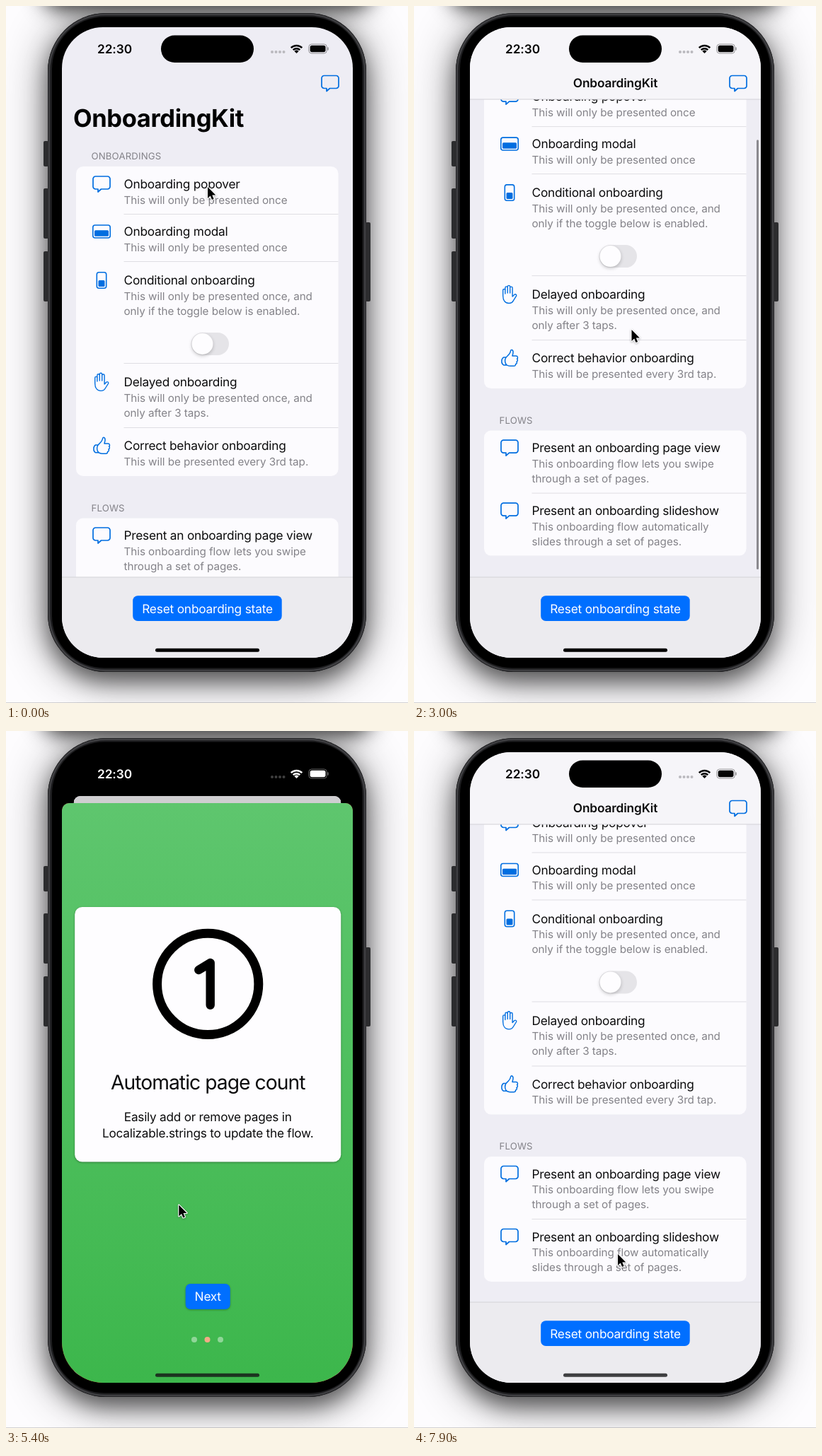
These frames come from a looping animation (568 px wide and 986 px high, 8000 ms). An HTML page with a canvas:

```html
<!DOCTYPE html>
<html lang="en">
<head>
<meta charset="utf-8">
<title>OnboardingKit</title>
<style>
  html, body { margin: 0; width: 100%; height: 100%; overflow: hidden; background: #fdfcfe; }
  canvas { display: block; width: 568px; height: 986px; }
</style>
</head>
<body>
<canvas id="stage"></canvas>
<script>
const W = 568, H = 986, LOOP = 8000, STEP = 100;
const BLUE = '#006ee0', TINT = '#006fff', GREY = '#838288', INK = '#0c0c0d';
const MAX_SCROLL = 122.5, PAGE_W = 411, MID = 284.5;
const canvas = document.getElementById('stage');
const ctx = canvas.getContext('2d');
const dpr = window.devicePixelRatio || 1;
canvas.width = W * dpr;
canvas.height = H * dpr;

const clamp = v => Math.max(0, Math.min(1, v));
const smooth = u => u * u * (3 - 2 * u);
const easeOut = u => 1 - (1 - u) ** 3;
const ramp = (t, a, b) => clamp((t - a) / (b - a));
const mix = (a, b, u) => a + (b - a) * u;
const mixRgb = (a, b, u) => `rgb(${a.map((v, i) => Math.round(mix(v, b[i], u)))})`;
const spring = ms => ms <= 0 ? 0 : 1 - Math.exp(-ms * .015) * (1 + ms * .015);

// ---------- timing ----------
const DRAG_LIST = 1800, DROP_LIST = 2700, OPEN = 3608, CLOSE = 6900;
const SWIPES = [
  { from: 4900, to: 5100, flip: 5118, x: 365 },
  { from: 5780, to: 6050, flip: 6054, x: 417.5 }
];
const POINTER = [
  [0, 286, 257], [900, 286, 257], [1500, 318, 455], [1800, 318, 455],
  [2400, 313, 288], [2700, 313, 288], [3300, 304, 630], [3900, 304, 630],
  [4700, 359, 651], [4800, 359, 651], [4900, 365, 655], [5100, 195, 665],
  [5250, 185, 665], [5700, 417.5, 690], [5780, 417.5, 690], [6000, 218, 696],
  [6050, 218, 696], [6600, 281, 803], [6950, 281, 803], [7500, 289, 741], [8000, 289, 741]
];

function pointerAt(t) {
  let i = 1;
  while (i < POINTER.length - 1 && POINTER[i][0] < t) i++;
  const [a, b] = [POINTER[i - 1], POINTER[i]];
  const u = smooth(ramp(t, a[0], b[0]));
  return { x: mix(a[1], b[1], u), y: mix(a[2], b[2], u) };
}

// Finger distance turned into scroll, with rubber band past the end.
function scrollAt(t) {
  const pulled = 455 - pointerAt(Math.max(DRAG_LIST, Math.min(t, DROP_LIST))).y;
  const s = Math.min(pulled, MAX_SCROLL) + Math.max(0, pulled - MAX_SCROLL) * .483;
  return t < DROP_LIST ? s : mix(s, MAX_SCROLL, easeOut(ramp(t, DROP_LIST, 3200)));
}

function pageOffsetAt(t) {
  let off = 0;
  for (const s of SWIPES) {
    if (t < s.from) break;
    const drag = s.x - pointerAt(Math.min(t, s.to)).x;
    off += mix(drag, PAGE_W, easeOut(ramp(t, s.to, s.to + 350)));
  }
  return off;
}

// ---------- drawing helpers ----------
function box(x, y, w, h, r, fill) {
  ctx.beginPath();
  ctx.roundRect(x, y, w, h, r);
  if (fill) { ctx.fillStyle = fill; ctx.fill(); }
}

function disc(x, y, r, fill) {
  ctx.beginPath();
  ctx.arc(x, y, r, 0, 7);
  ctx.fillStyle = fill;
  ctx.fill();
}

function withShadow(color, blur, dy, draw) {
  ctx.save();
  ctx.shadowColor = color;
  ctx.shadowBlur = blur * dpr;
  ctx.shadowOffsetY = dy * dpr;
  draw();
  ctx.restore();
}

// y is the middle of the capitals; track is in em.
function text(str, x, y, size, color = INK, { weight = 400, align = 'left', track = -.013 } = {}) {
  const base = 14;
  ctx.save();
  ctx.translate(x, y + size * .3635);
  ctx.scale(size / base, size / base);
  ctx.font = `${weight} ${base}px Inter, "Open Sans", sans-serif`;
  ctx.textRendering = 'geometricPrecision';
  ctx.letterSpacing = track * base + 'px';
  ctx.textAlign = align;
  ctx.fillStyle = color;
  ctx.fillText(str, 0, 0);
  ctx.restore();
}

const centred = (str, x, y, size, color, more) => text(str, x, y, size, color, { align: 'center', ...more });

function outline(path, x, y, color, width) {
  ctx.save();
  ctx.translate(x, y);
  ctx.strokeStyle = color;
  ctx.lineWidth = width;
  ctx.lineCap = ctx.lineJoin = 'round';
  ctx.stroke(path);
  ctx.restore();
}

// ---------- icons ----------
const BUBBLE = new Path2D('M-8.5-11H8.5a3.5 3.5 0 0 1 3.5 3.5V3.5A3.5 3.5 0 0 1 8.5 7H-.5L-5 11V7H-8.5A3.5 3.5 0 0 1-12 3.5V-7.5A3.5 3.5 0 0 1-8.5-11Z');
const HAND = new Path2D('M-9.3 2V-6a1.6 1.6 0 0 1 3.2 0V-1M-6.1-2V-9.5a1.7 1.7 0 0 1 3.4 0V-2M-2.7-3V-11a1.7 1.7 0 0 1 3.4 0V-2M.7-3V-9.3a1.7 1.7 0 0 1 3.4 0V3L7 0a1.7 1.7 0 0 1 2.6 2L5.5 8.5C4 11.5 1.5 12.4-1 12.4-6 12.4-9.3 8.5-9.3 2');
const THUMB = new Path2D('M-5-1C-3-3 1-6 1.5-10 1.8-12.8 5.5-12.2 5-7.5 4.8-5.5 4-4 4-3H9C12-3 12 .5 10.5 1 12 2 11.5 4.5 10 5 11 6.5 10 8.5 8.5 8.5 8.8 10.5 7.5 11.2 6 11.2H1C-2 11.2-3 10-5.5 9.5M-5-1H-8.5C-12 1-12 8-8.5 9.8H-4C-7 7-7 2-5-1');

const ICONS = {
  bubble: (x, y, c) => outline(BUBBLE, x, y, c, 1.7),
  hand: (x, y, c) => outline(HAND, x, y, c, 1.4),
  thumb: (x, y, c) => outline(THUMB, x, y, c, 1.5),
  modal: (x, y, c) => panel(x, y, 26, 19.5, 8.5, c),
  sheet: (x, y, c) => panel(x, y, 15, 24, 9, c)
};

function panel(x, y, w, h, fillH, color) {
  box(x - w / 2 + .8, y - h / 2 + .8, w - 1.6, h - 1.6, 3);
  ctx.strokeStyle = color;
  ctx.lineWidth = 1.6;
  ctx.stroke();
  box(x - w / 2 + 3, y + h / 2 - 3 - fillH, w - 6, fillH, 1.5, color);
}

// ---------- list screen ----------
const ONCE = 'This will only be presented once';
const ROWS = [
  { y: 252, icon: 'bubble', title: 'Onboarding popover', lines: [ONCE] },
  { y: 319, icon: 'modal', title: 'Onboarding modal', lines: [ONCE], rule: 294.5 },
  { y: 388, icon: 'sheet', title: 'Conditional onboarding', lines: [ONCE + ', and', 'only if the toggle below is enabled.'], rule: 361.5 },
  { y: 532, icon: 'hand', title: 'Delayed onboarding', lines: [ONCE + ', and', 'only after 3 taps.'], rule: 505.5 },
  { y: 622, icon: 'thumb', title: 'Correct behavior onboarding', lines: ['This will be presented every 3rd tap.'], rule: 596.5 },
  { y: 749, icon: 'bubble', title: 'Present an onboarding page view', lines: ['This onboarding flow lets you swipe', 'through a set of pages.'] },
  { y: 838, icon: 'bubble', title: 'Present an onboarding slideshow', lines: ['This onboarding flow automatically', 'slides through a set of pages.'], rule: 813 }
];

function drawList(scroll, tint) {
  ctx.save();
  ctx.beginPath();
  ctx.rect(79, 132, 411, 676);
  ctx.clip();
  ctx.translate(0, -scroll);
  text('OnboardingKit', 95, 158, 34.5, '#000', { weight: 700, track: -.011 });
  for (const [label, y, top, end] of [['ONBOARDINGS', 212.5, 227, 665], ['FLOWS', 710, 724.5, 901.5]]) {
    text(label, 120.5, y, 13.2, GREY, { track: .011 });
    box(99, top, 370.5, end - top, 10, '#fcfbfe');
  }
  for (const row of ROWS) {
    if (row.rule) {
      ctx.fillStyle = '#dfdee3';
      ctx.fillRect(166.5, row.rule - .5, 303, 1);
    }
    ICONS[row.icon](135, row.y, tint);
    text(row.title, 166.5, row.y, 17.25);
    row.lines.forEach((s, i) => text(s, 166.5, row.y + 22.3 + i * 21, 15.23, GREY, { track: -.003 }));
  }
  box(261.5, 462, 53.5, 32, 16, '#e5e4e8');
  withShadow('rgba(0,0,0,.22)', 5, 2, () => disc(277.5, 478, 15, '#fefdff'));
  ctx.restore();
}

function drawIndicator(t, scroll) {
  const alpha = ramp(t, 1800, 1900) * (1 - ramp(t, 3850, 4100));
  if (!alpha) return;
  const bottom = 797 - Math.max(0, MAX_SCROLL - scroll) * .85;
  const top = Math.max(136, 188 + (scroll - MAX_SCROLL) * .95);
  ctx.globalAlpha = alpha;
  box(484, top, 3, bottom - top, 1.5, '#8b8a8f');
  ctx.globalAlpha = 1;
}

function drawHome(t, p) {
  const scroll = scrollAt(t);
  const tint = p ? mixRgb([0, 110, 224], [142, 142, 147], p) : BLUE;
  ctx.fillStyle = '#eeedf4';
  ctx.fillRect(79, 30, 411, 892);
  drawList(scroll, tint);
  const bar = ramp(scroll, 36, 52);
  if (bar) {
    ctx.globalAlpha = bar;
    ctx.fillStyle = '#f6f5f9';
    ctx.fillRect(79, 30, 411, 102);
    ctx.fillStyle = '#d3d2d7';
    ctx.fillRect(79, 131.5, 411, 1);
    centred('OnboardingKit', MID, 109, 17.25, INK, { weight: 600, track: -.008 });
    ctx.globalAlpha = 1;
  }
  ICONS.bubble(458, 109.5, tint);
  drawIndicator(t, scroll);
  ctx.fillStyle = '#ecebef';
  ctx.fillRect(79, 808, 411, 114);
  ctx.fillStyle = '#d4d3d8';
  ctx.fillRect(79, 807.5, 411, 1);
  box(179.2, 834.3, 210.5, 35.8, 7, TINT);
  centred('Reset onboarding state', MID, 852.5, 17.25, '#fff', { track: -.01 });
}

// ---------- sheet ----------
const PAGES = [
  { shades: ['#ff554d', '#ff342b'], dot: '#e6dfa8', title: 'Localized onboardings',
    lines: ['OnboardingKit can resolve pages by', 'parsing localized strings.'], button: 'Next', half: 31.5,
    digit: 'M0-30C14-30 20.5-17 20.5 0S14 30 0 30-20.5 17-20.5 0-14-30 0-30Z' },
  { shades: ['#54cd70', '#30bf4e'], dot: '#f3ab86', title: 'Automatic page count',
    lines: ['Easily add or remove pages in', 'Localizable.strings to update the flow.'], button: 'Next', half: 31.5,
    digit: 'M-13-20L3.5-30V30' },
  { shades: ['#2b88ff', '#006eff'], dot: '#ffd566', title: "That's it",
    lines: ['You can use OnboardingPageView and', 'OnboardingSlideshow to easily display', 'localized onboardings.'], button: 'Done', half: 34.5,
    digit: 'M-18-16.5C-17-25-9-30 0-30 11-30 19-24 19-14 19-6 15-1.5 10 4L-17.5 29.5H20.5' }
];
PAGES.forEach(p => p.path = new Path2D(p.digit));

function drawCard(page, x, scale) {
  const h = 316.5 + page.lines.length * 23;
  const top = -h / 2;
  ctx.save();
  ctx.translate(x, 429.3);
  ctx.scale(scale, scale);
  withShadow('rgba(0,0,0,.35)', 3, 1, () => box(-189, top, 378, h, 10.5, '#fefdff'));
  ctx.beginPath();
  ctx.arc(0, top + 109.5, 72, 0, 7);
  ctx.strokeStyle = '#000';
  ctx.lineWidth = 13;
  ctx.stroke();
  outline(page.path, 0, top + 109.5, '#000', 12.5);
  centred(page.title, 0, top + 249, 28.4, INK, { track: -.034 });
  page.lines.forEach((s, i) => centred(s, 0, top + 298 + i * 23, 17.25));
  ctx.restore();
}

function fillShade(page, alpha) {
  const g = ctx.createLinearGradient(0, 102, 0, 922);
  page.shades.forEach((c, i) => g.addColorStop(i, c));
  ctx.globalAlpha = alpha;
  ctx.fillStyle = g;
  ctx.fillRect(79, 102, 411, 820);
  ctx.globalAlpha = 1;
}

function drawSheet(t, p) {
  ctx.save();
  ctx.translate(0, 820 * (1 - p));
  box(79, 102, 411, 840, [10.5, 10.5, 0, 0]);
  ctx.clip();
  const arrive = [1, ...SWIPES.map(s => ramp(t, s.flip, s.flip + 300))];
  const offset = pageOffsetAt(t);
  const current = SWIPES.filter(s => t >= s.flip).length;
  PAGES.forEach((page, i) => { if (arrive[i]) fillShade(page, arrive[i]); });
  PAGES.forEach((page, i) => {
    const x = MID + i * PAGE_W - offset;
    if (Math.abs(x - MID) > PAGE_W) return;
    const active = smooth(arrive[i]) - smooth(arrive[i + 1] || 0);
    drawCard(page, x, .5 + .5 * active);
    const pressed = i === 2 && t > 6720 && t < CLOSE;
    withShadow('rgba(0,0,0,.3)', 3, 1, () => box(x - page.half, 782, page.half * 2, 36, 7, pressed ? '#0a70f5' : TINT));
    centred(page.button, x, 800, 17.25, pressed ? '#dce8fb' : '#fff');
  });
  PAGES.forEach((page, i) =>
    disc(MID + (i - 1) * 18.5, 861, 4, i === current ? page.dot : 'rgba(255,255,255,.42)'));
  ctx.restore();
}

// ---------- device ----------
function drawBackdrop() {
  ctx.fillStyle = '#fdfcfe';
  ctx.fillRect(0, 0, W, H);
  // lower edge of the shadow cast from above the stage
  withShadow('rgba(0,0,0,.85)', 30, 6, () => box(50, -80, 468, 79, 30, '#555'));
  ctx.fillStyle = '#d2d1d3';
  ctx.fillRect(0, 985, W, 1);
}

function drawBody() {
  const shell = () => box(59, 10, 450, 932, 82, '#1d1d1f');
  withShadow('rgba(0,0,0,.45)', 64, 8, shell);
  withShadow('rgba(0,0,0,.5)', 30, 14, shell);
  for (const [x, y, h] of [[53, 191, 36], [53, 258, 71], [53, 347, 71], [508, 306, 112]]) box(x, y, 7, h, 2, '#2c2c2e');
  box(61, 12, 446, 928, 80);
  ctx.strokeStyle = '#3f3f42';
  ctx.lineWidth = 2.5;
  ctx.stroke();
  box(65, 15.5, 438.5, 921, 74, '#000');
}

function drawStatus(p) {
  const dark = p > .04;
  const v = Math.round(255 * ramp(p, .68, 1));
  const c = dark ? `rgb(${v},${v},${v})` : '#050505';
  text('22:30', 129, 60.5, 17.25, c, { weight: 600, track: -.004 });
  for (let i = 0; i < 4; i++) disc(376 + i * 5.5, 65, 2, dark ? `rgba(${v},${v},${v},.25)` : '#bab9be');
  ctx.strokeStyle = c;
  ctx.lineWidth = 2.5;
  for (const r of [12, 7.8]) {
    ctx.beginPath();
    ctx.arc(410.5, 67, r - 1, -Math.PI * .75, -Math.PI * .25);
    ctx.stroke();
  }
  ctx.beginPath();
  ctx.moveTo(410.5, 67);
  ctx.arc(410.5, 67, 4.4, -Math.PI * .75, -Math.PI * .25);
  ctx.fillStyle = c;
  ctx.fill();
  ctx.globalAlpha = .4;
  box(427.8, 54, 25.5, 13, 4);
  ctx.lineWidth = 1;
  ctx.stroke();
  box(454.3, 58.3, 1.5, 4.4, .8, c);
  ctx.globalAlpha = 1;
  box(429.6, 55.8, 21.9, 9.4, 2.6, c);
}

function drawPointer({ x, y }) {
  const pts = [[0, 0], [0, 16], [3.7, 12.6], [6, 18], [8.6, 16.9], [6.3, 11.6], [11.3, 11.4]];
  ctx.beginPath();
  pts.forEach(([dx, dy]) => ctx.lineTo(x - 1 + dx, y - 1 + dy));
  ctx.closePath();
  ctx.lineJoin = 'round';
  ctx.lineWidth = 2.2;
  ctx.strokeStyle = '#fff';
  withShadow('rgba(0,0,0,.3)', 3, 1, () => ctx.stroke());
  ctx.fillStyle = '#000';
  ctx.fill();
}

function draw(t) {
  let p = t < CLOSE ? spring(t - OPEN) : 1 - spring(t - CLOSE);
  if (p < .001) p = 0;
  ctx.setTransform(dpr, 0, 0, dpr, 0, 0);
  drawBackdrop();
  drawBody();

  ctx.save();
  box(79, 30, 411, 892, 58, '#000');
  ctx.clip();
  // the list recedes as the sheet comes up
  ctx.save();
  const scale = 1 - .081 * p;
  ctx.translate(MID, 30 + 62 * p);
  ctx.scale(scale, scale);
  ctx.translate(-MID, -30);
  if (p) {
    box(79, 30, 411, 892, 10.5);
    ctx.clip();
  }
  drawHome(t, p);
  ctx.fillStyle = `rgba(0,0,0,${.16 * p})`;
  ctx.fillRect(79, 30, 411, 892);
  ctx.restore();
  drawStatus(p);
  box(219, 41.5, 131, 38.5, 19.2, '#000');
  if (p) drawSheet(t, p);
  box(211, 908.8, 147, 5, 2.5, t < OPEN ? '#000' : 'rgba(20,20,22,.8)');
  ctx.restore();

  drawPointer(pointerAt(t));
}

const start = performance.now();
function tick(now) {
  const t = Math.max(0, now - start) % LOOP;
  draw(Math.floor(t / STEP) * STEP);
  requestAnimationFrame(tick);
}
draw(0);
requestAnimationFrame(tick);
</script>
</body>
</html>
```
